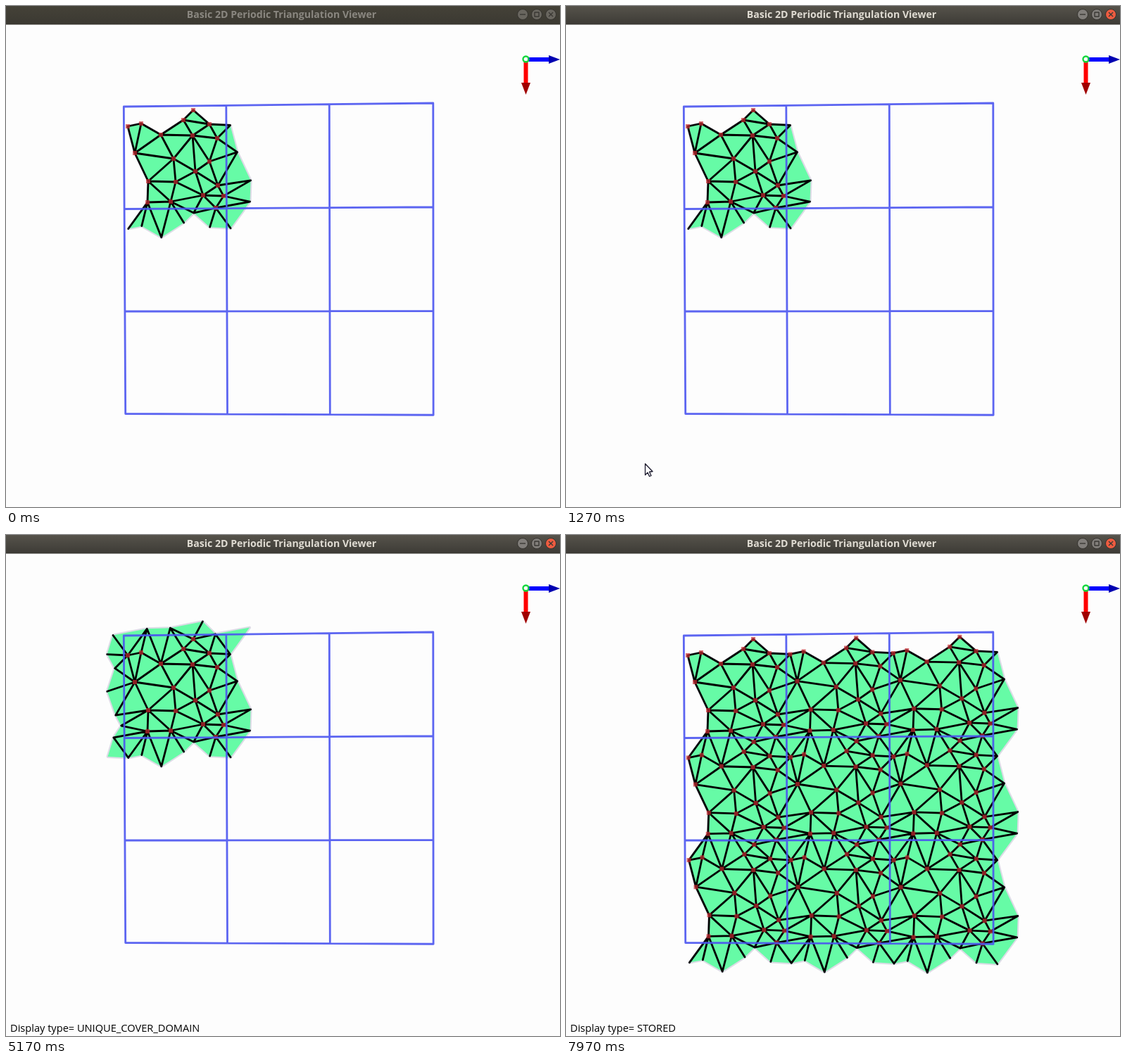
An HTML page with a canvas for the animation above (8 s loop, 787 px wide and 712 px high).

```html
<!DOCTYPE html>
<html lang="en">
<head>
<meta charset="utf-8">
<title>Periodic triangulation</title>
<style>
  html, body { margin: 0; width: 100%; height: 100%; overflow: hidden; background: #fdfdfd; }
  canvas { display: block; }
</style>
</head>
<body>
<canvas id="stage" width="787" height="712"></canvas>
<script>
const ctx = document.getElementById('stage').getContext('2d');
const LOOP = 8000;

// Screen positions of the vertices in the first domain cell.
const points = [
  [173, 171], [192, 167], [183, 209], [220, 183], [252, 162], [266, 148], [289, 168],
  [265, 184], [300, 188], [289, 221], [238, 217], [269, 235], [202, 249], [241, 250],
  [301, 255], [309, 270], [280, 269], [201, 279], [234, 278], [298, 287]
].map(toCell);

// Triangle fans: hub first, then its rim; x and y mark the copy in the next cell.
const fans = [
  '2 0 1 3 10 12', '7 8 9 11 10 3 4 6 8', '13 10 11 16 18 12 10',
  '14 9 2x 12x 15 16 11 9', '19 15 17x 0xy 6y 5y 16 15', '8 6 0x 2x 9',
  '18 12 17 3y 4y 5y 16', '17 0y 1y 3y', '4 5 6', '15 12x 17x'
];

const faces = fans.flatMap(fan => {
  const [hub, ...rim] = fan.split(' ');
  return rim.slice(1).map((name, i) => [hub, rim[i], name]);
});

// An edge lying wholly in a neighbouring cell belongs to that cell.
const edgeKeys = new Set(faces.flatMap(([a, b, c]) => [[a, b], [b, c], [c, a]])
  .filter(([a, b]) => !['x', 'y'].some(s => a.includes(s) && b.includes(s)))
  .map(edge => edge.sort().join(' ')));
const edges = [...edgeKeys].map(key => key.split(' '));

// The slightly tilted camera: cell coordinates to pixels and back.
function project(u, v) {
  return [167.3 + 145 * u + 0.5 * u * u + v * (0.8 - 0.23 * u),
          143 - 1.67 * u + v * (145.5 + 0.75 * u)];
}

function toCell([x, y]) {
  let u = 0, v = 0;
  for (let i = 0; i < 8; i++) {
    const [px, py] = project(u, v);
    u += (x - px) / 145;
    v += (y - py) / 146;
  }
  return [u, v];
}

function locate(name, [i, j]) {
  const [u, v] = points[parseInt(name, 10)];
  return project(u + i + name.includes('x'), v + j + name.includes('y'));
}

const tiles = [0, 1, 2].flatMap(j => [0, 1, 2].map(i => [i, j]));

function copies(shape, mode) {
  if (mode === 'STORED') return tiles;
  if (mode === 'UNIQUE') return [[0, 0]];
  const shifts = axis => shape.some(name => name.includes(axis)) ? [0, -1] : [0];
  return shifts('x').flatMap(i => shifts('y').map(j => [i, j]));
}

function trace(path, pts, close) {
  pts.forEach(([x, y], i) => i ? path.lineTo(x, y) : path.moveTo(x, y));
  if (close) path.closePath();
  return path;
}

function polygon(color, ...pts) {
  ctx.fillStyle = color;
  ctx.fill(trace(new Path2D(), pts, true));
}

function stroke(path, color, width) {
  ctx.strokeStyle = color;
  ctx.lineWidth = width;
  ctx.stroke(path);
}

// Opposite windings would cancel where faces overlap, so each is its own subpath.
function buildScene(mode) {
  const scene = { faces: new Path2D(), edges: new Path2D(), dots: new Path2D() };
  const add = (shapes, path, close) => shapes.forEach(shape =>
    copies(shape, mode).forEach(tile =>
      trace(path, shape.map(name => locate(name, tile)), close)));
  add(faces, scene.faces, true);
  add(edges, scene.edges, false);
  for (const [i, j] of mode === 'STORED' ? tiles : [[0, 0]])
    for (const [u, v] of points) {
      const [x, y] = project(u + i, v + j);
      scene.dots.rect(x - 3, y - 3, 6, 6);
    }
  return scene;
}

const scenes = {};
for (const mode of ['UNIQUE', 'UNIQUE_COVER_DOMAIN', 'STORED']) scenes[mode] = buildScene(mode);

const grid = new Path2D();
for (let k = 0; k < 4; k++) {
  trace(grid, [0, 1, 2, 3].map(n => project(n, k)));
  trace(grid, [0, 1, 2, 3].map(n => project(k, n)));
}

function drawTriangulation(mode) {
  const scene = scenes[mode];
  ctx.lineJoin = ctx.lineCap = 'round';
  stroke(scene.faces, '#dcdce6', 4);
  ctx.fillStyle = '#66fba6';
  ctx.fill(scene.faces);
  stroke(scene.edges, '#000', 2.8);
  ctx.fillStyle = 'rgba(200, 45, 50, 0.7)';
  ctx.fill(scene.dots);
  stroke(grid, 'rgba(75, 85, 240, 0.9)', 2.8);
}

function drawAxes() {
  ctx.fillStyle = '#f00';
  ctx.fillRect(735.5, 78, 6, 33);
  polygon('#a00000', [732, 109], [745, 109], [738.5, 126]);
  ctx.fillStyle = '#00f';
  ctx.fillRect(741, 73, 31, 6);
  polygon('#0000b0', [771, 70], [771, 82], [787, 76]);
  const ring = new Path2D();
  ring.arc(738.5, 75.5, 4, 0, 7);
  stroke(ring, '#14d83c', 2.4);
}

function drawTitleBar(active) {
  const shade = ctx.createLinearGradient(0, 0, 0, 26);
  shade.addColorStop(0, active ? '#56534b' : '#454238');
  shade.addColorStop(1, active ? '#3d3b36' : '#3b3932');
  ctx.fillStyle = shade;
  ctx.fillRect(0, 0, 787, 26.5);
  ctx.fillStyle = active ? '#dfdbd2' : '#8a8780';
  ctx.font = 'bold 14.1px "Open Sans", sans-serif';
  ctx.textAlign = 'center';
  ctx.fillText('Basic 2D Periodic Triangulation Viewer', 391.5, 17);

  ctx.lineCap = 'butt';
  [734, 754, 774].forEach((x, i) => {
    const disc = new Path2D();
    disc.arc(x, 12, 7.5, 0, 7);
    ctx.fillStyle = !active ? '#69665f' : i === 2 ? '#ee5c40' : '#817e7a';
    ctx.fill(disc);
    stroke(disc, '#35332f', 1);
    const sign = new Path2D();
    if (i === 0) trace(sign, [[x - 4, 12], [x + 4, 12]]);
    if (i === 1) sign.rect(x - 3, 9, 6, 6);
    if (i === 2) {
      trace(sign, [[x - 3, 9], [x + 3, 15]]);
      trace(sign, [[x + 3, 9], [x - 3, 15]]);
    }
    stroke(sign, '#3a3834', 1.4);
  });
}

// Pointer stops: time, x, y.
const route = [
  [30, 3, 590], [400, 158, 613], [600, 147, 621], [830, 131, 632],
  [1130, 112, 650], [1300, 112, 650], [1700, -14, 656]
];

function drawPointer(t) {
  const next = route.findIndex(stop => stop[0] > t);
  if (next < 1) return;
  const [a, b] = [route[next - 1], route[next]];
  const k = (t - a[0]) / (b[0] - a[0]);
  ctx.save();
  ctx.translate(a[1] + (b[1] - a[1]) * k, a[2] + (b[2] - a[2]) * k);
  const arrow = [[0.5, 0.5], [0.5, 16.5], [4, 13], [6.5, 18.5], [9, 17.5], [6.5, 12], [11, 11.5]];
  polygon('#fff', ...arrow);
  stroke(trace(new Path2D(), arrow, true), '#1c1a2e', 1.3);
  ctx.restore();
}

function drawMessage(text) {
  ctx.fillStyle = '#000';
  ctx.font = '14.6px "Open Sans", sans-serif';
  ctx.textAlign = 'left';
  ctx.fillText('Display type= ' + text, 6, 706);
}

function draw(now) {
  const t = now % LOOP;
  const mode = t < 5070 ? 'UNIQUE' : t < 7970 ? 'UNIQUE_COVER_DOMAIN' : 'STORED';
  ctx.fillStyle = '#fdfdfd';
  ctx.fillRect(0, 0, 787, 712);
  drawTriangulation(mode);
  drawAxes();
  drawTitleBar(t >= 1270);
  if (t >= 3670 && t < 7270 || t >= 7970) drawMessage(mode);
  drawPointer(t);
}

const start = performance.now();
function tick() {
  draw(performance.now() - start);
  requestAnimationFrame(tick);
}
tick();
</script>
</body>
</html>
```
